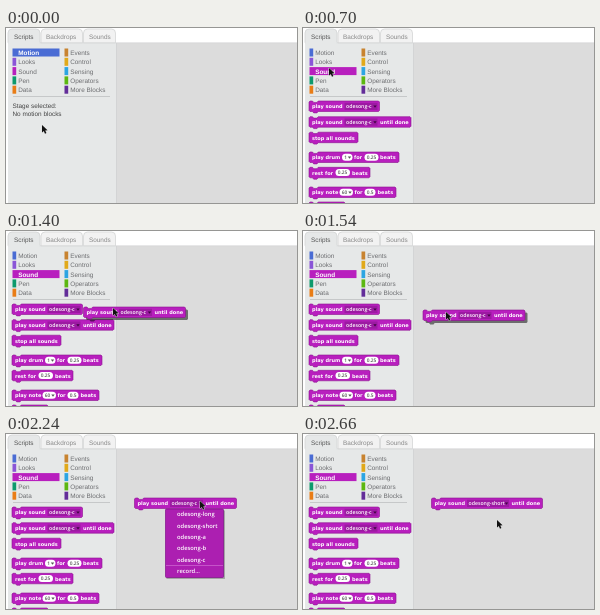
Write an HTML page with a canvas that moves like this. It is 291 px wide and 175 px high and loops after 4660 ms.

```html
<!DOCTYPE html>
<html lang="en">
<head>
<meta charset="utf-8">
<title>Sound blocks</title>
<style>
html, body { margin: 0; width: 100%; height: 100%; overflow: hidden; background: #dcdcdc; }
canvas { display: block; width: 291px; height: 175px; }
</style>
</head>
<body>
<canvas id="stage" width="291" height="175"></canvas>
<script>
const ctx = document.getElementById('stage').getContext('2d');
ctx.textRendering = 'geometricPrecision';
const STEP = 140, LOOP = 4660;
const UI = '"Liberation Sans", Arial, sans-serif';
const BLOCK = '"DejaVu Sans", Verdana, sans-serif';
const SLOT = '"Open Sans", sans-serif';
const PURPLE = '#b81fbe', DARK = '#8c128f', GREY = '#6c6d70';

// Cursor tip for each time step
const cursorPath = [
  [36, 97], [35, 83], [30, 67], [26, 49], [26, 40], [26, 40], [26, 55],
  [27, 78], [29, 91], [34, 94], [107, 77], [143, 81], [152, 66], [152, 66],
  [198, 69], [194, 67], [194, 67], [194, 80], [194, 88], [194, 86]
];
const dragPath = [[11, 92], [77.5, 76], [120, 79], [128.5, 64]];
const DRAG = 9, DROP = 13, MENU_OPEN = 15, MENU_CLOSE = 19;

const categories = [
  ['Motion', '#4a6cd4'], ['Looks', '#8a55d7'], ['Sound', '#b81fbe'],
  ['Pen', '#0e9a6c'], ['Data', '#e97d16'], ['Events', '#c88330'],
  ['Control', '#e1a91a'], ['Sensing', '#2ca5e2'], ['Operators', '#5cb712'],
  ['More Blocks', '#632d99']
];
const menuItems = ['odesong-long', 'odesong-short', 'odesong-a', 'odesong-b', 'odesong-c', 'record...'];

function rect(x, y, w, h, fill) {
  ctx.fillStyle = fill;
  ctx.fillRect(x, y, w, h);
}

function rounded(x, y, w, h, r, fill, stroke) {
  ctx.beginPath();
  ctx.roundRect(x, y, w, h, r);
  ctx.fillStyle = fill;
  ctx.fill();
  if (stroke) {
    ctx.strokeStyle = stroke;
    ctx.lineWidth = 0.7;
    ctx.stroke();
  }
}

function text(str, x, baseline, font, fill) {
  ctx.font = font;
  ctx.fillStyle = fill;
  ctx.fillText(str, x, baseline);
}

const label = (str, x, y, fill = GREY, weight = '') =>
  text(str, x, y, `${weight} 6.4px ${UI}`, fill);
const word = (str, x, y) => text(str, x, y, `bold 5px ${BLOCK}`, '#fff');

function blockShape(x, y, w) {
  const h = 10.5;
  ctx.beginPath();
  ctx.moveTo(x, y + 1);
  ctx.lineTo(x + 1, y);
  ctx.lineTo(x + 3.5, y);
  ctx.lineTo(x + 4.7, y + 1.4);
  ctx.lineTo(x + 8, y + 1.4);
  ctx.lineTo(x + 9.2, y);
  ctx.lineTo(x + w - 1, y);
  ctx.lineTo(x + w, y + 1);
  ctx.lineTo(x + w, y + h - 1);
  ctx.lineTo(x + w - 1, y + h);
  ctx.lineTo(x + 9.2, y + h);
  ctx.lineTo(x + 8, y + h + 1.4);
  ctx.lineTo(x + 4.7, y + h + 1.4);
  ctx.lineTo(x + 3.5, y + h);
  ctx.lineTo(x + 1, y + h);
  ctx.lineTo(x, y + h - 1);
  ctx.closePath();
}

function block(x, y, w, lifted) {
  if (lifted) {
    blockShape(x + 2.5, y + 2.5, w);
    ctx.fillStyle = 'rgba(0,0,0,.5)';
    ctx.fill();
  }
  blockShape(x, y, w);
  ctx.fillStyle = PURPLE;
  ctx.fill();
  ctx.strokeStyle = DARK;
  ctx.lineWidth = 0.6;
  ctx.stroke();
}

function arrow(x, y, fill) {
  ctx.beginPath();
  ctx.moveTo(x, y);
  ctx.lineTo(x + 3.4, y);
  ctx.lineTo(x + 1.7, y + 2.2);
  ctx.fillStyle = fill;
  ctx.fill();
}

function soundBlock(x, y, sound, waits, lifted) {
  const extra = sound === 'odesong-short' ? 9 : 0;
  block(x, y, (waits ? 102 : 70.5) + extra, lifted);
  word('play sound', x + 3, y + 7.3);
  rect(x + 35.5, y + 1.8, 33 + extra, 7.2, '#9c1aa2');
  text(sound, x + 37, y + 6.9, `600 5.2px ${SLOT}`, '#fff');
  arrow(x + 64.3 + extra, y + 4.5, '#400545');
  if (waits) word('until done', x + 71 + extra, y + 7.3);
}

function numberBlock(y, w, words, slots) {
  block(6, y, w);
  for (const [str, x] of words) word(str, x, y + 7.3);
  for (const [x, slotW, value, drop] of slots) {
    rounded(x, y + 1.8, slotW, 7, 3.5, '#fff');
    text(value, x + 2.2, y + 7, `600 4.8px ${SLOT}`, '#555');
    if (drop) arrow(x + slotW - 4.7, y + 4.5, '#555');
  }
}

function palette() {
  soundBlock(6, 73, 'odesong-c', false);
  soundBlock(6, 88.7, 'odesong-c', true);
  block(6, 104.2, 49);
  word('stop all sounds', 9, 111.5);
  numberBlock(124, 90, [['play drum', 9], ['for', 51], ['beats', 77]], [[39, 10.5, '1', true], [61.5, 14, '0.25']]);
  numberBlock(139.3, 61, [['rest for', 9], ['beats', 49]], [[32.5, 14.5, '0.25']]);
  numberBlock(159, 87, [['play note', 9], ['for', 51.5], ['beats', 74.5]], [[36.5, 13.5, '60', true], [61.5, 11, '0.5']]);
  block(6, 174, 36);
}

function frameUi() {
  rect(0, 0, 291, 175, '#fff');
  rect(110, 15, 181, 160, '#dcdcdc');
  rect(2, 15, 108, 160, '#e6e8e8');
  rect(2, 14.5, 289, 0.7, '#cfd0d1');
  rect(110, 15, 0.7, 160, '#cfd0d1');
  for (const [x, w, fill] of [[2, 32, '#e6e8e8'], [35, 41.5, '#f2f2f2'], [77.5, 32, '#f2f2f2']])
    rounded(x, 1, w, 13.8, [4, 4, 0, 0], fill, '#d0d1d2');
  rect(2.4, 14, 31.3, 2, '#e6e8e8');
  label('Scripts', 8, 10.5, '#555');
  label('Backdrops', 40, 10.5, '#888');
  label('Sounds', 83, 10.5, '#888');
}

function categoryList(selected, hovered) {
  categories.forEach(([name, color], i) => {
    const x = i < 5 ? 6.5 : 58.5, y = 20.5 + (i % 5) * 9.3;
    const active = name === selected;
    rect(x, y, active ? 47 : 3.7, 8, color);
    label(name, x + 5.7, y + 6.4, active ? '#fff' : name === hovered ? '#f08a28' : GREY, active ? 'bold' : '');
  });
  rect(7, 68, 97, 0.8, '#bfc1c2');
}

function menu(hover) {
  rect(160.5, 76.5, 58.5, 68.5, 'rgba(0,0,0,.25)');
  rounded(159.5, 75, 58, 68.5, 1, '#ac1fb1', '#80108a');
  if (hover >= 0) rect(160, 75.4 + hover * 11.3, 57, 10.8, '#c951cf');
  menuItems.forEach((item, i) => text(item, 171, 82.3 + i * 11.3, `600 5.8px ${SLOT}`, '#fff'));
  rect(160, 131.1, 57, 0.7, '#d06ad4');
}

function cursor(x, y) {
  ctx.beginPath();
  ctx.moveTo(x, y);
  for (const [dx, dy] of [[0, 7.4], [1.8, 5.9], [3, 8.7], [4.4, 8.1], [3.2, 5.4], [5.5, 5.3]])
    ctx.lineTo(x + dx, y + dy);
  ctx.closePath();
  ctx.lineWidth = 0.9;
  ctx.strokeStyle = '#ddd';
  ctx.stroke();
  ctx.fillStyle = '#111';
  ctx.fill();
}

function draw(now) {
  const step = Math.min(Math.floor((now % LOOP) / STEP), cursorPath.length - 1);
  const soundTab = step >= 5;
  frameUi();
  categoryList(soundTab ? 'Sound' : 'Motion', { 3: 'Pen', 4: 'Sound' }[step]);
  if (soundTab) palette();
  else {
    label('Stage selected:', 6.5, 79.7, '#444');
    label('No motion blocks', 6.5, 88.2, '#444');
  }
  if (step >= DRAG) {
    const [x, y] = dragPath[Math.min(step - DRAG, dragPath.length - 1)];
    soundBlock(x, y, step >= MENU_CLOSE ? 'odesong-short' : 'odesong-c', true, step < DROP);
  }
  if (step >= MENU_OPEN && step < MENU_CLOSE) menu(step === 17 ? 0 : step === 18 ? 1 : -1);
  cursor(...cursorPath[step]);
}

const start = performance.now();
function tick() {
  draw(performance.now() - start);
  requestAnimationFrame(tick);
}
tick();
</script>
</body>
</html>
```
